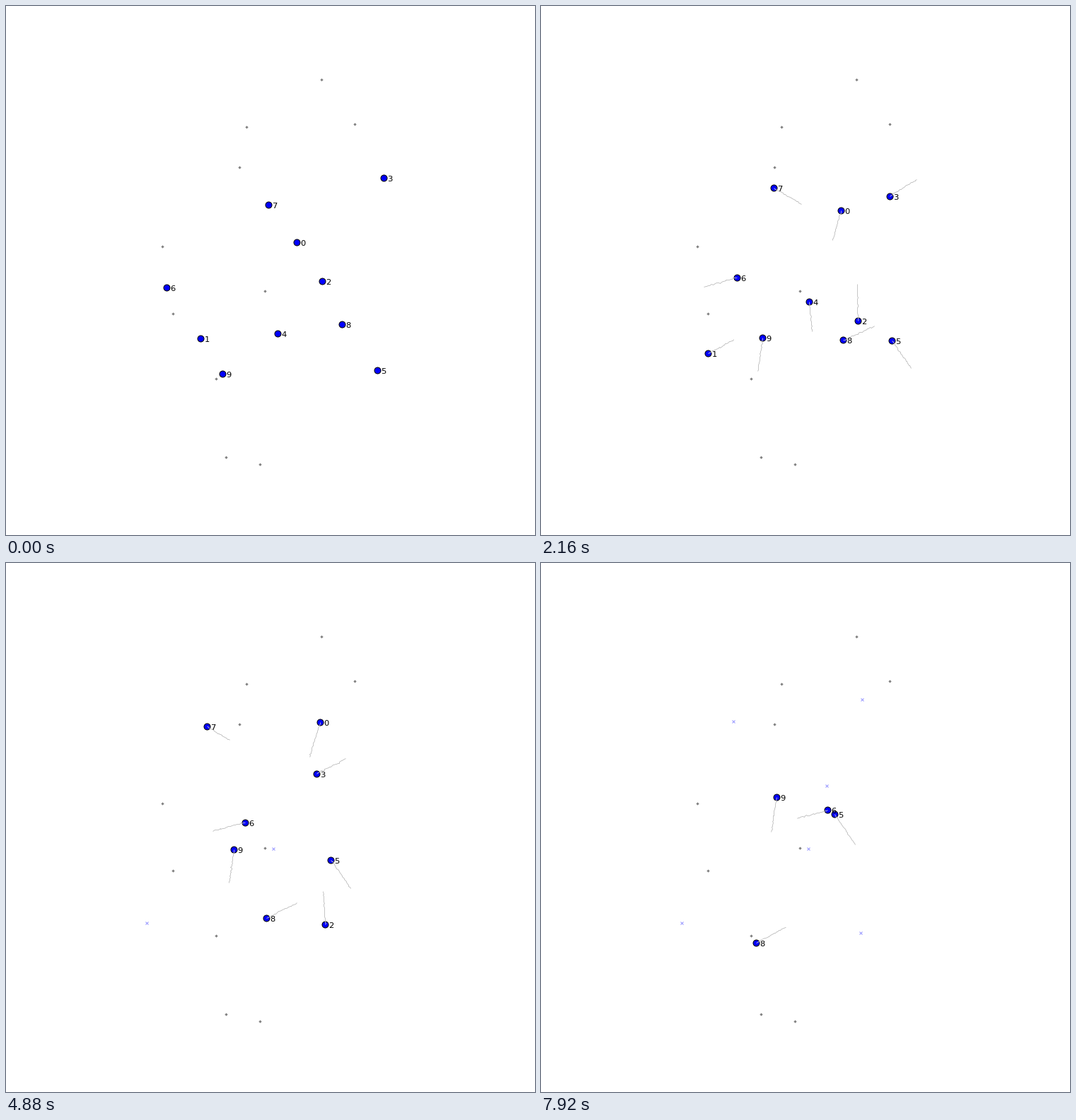
Recreate the animation shown at these times as a matplotlib script. Size 748x748 px, loop 8000 ms.

```python
import numpy as np
import matplotlib.pyplot as plt
from matplotlib.animation import FuncAnimation
from matplotlib.collections import LineCollection

SIZE, FRAMES, INTERVAL = 748, 100, 80
PX = 0.72          # one pixel in points at 100 dpi
TRAIL = 25         # remembered steps

# Start, halfway point, end, and number of steps in the walk
WALKERS = [
    ((411, 334), (430, 270), (454, 193), 77),
    ((275, 470), (232, 493), (199, 509), 60),
    ((447, 389), (448, 459), (452, 523), 67),
    ((534, 243), (472, 281), (404, 315), 82),
    ((384, 463), (380, 433), (378, 404), 35),
    ((525, 515), (472, 438), (414, 354), FRAMES),
    ((227, 398), (319, 371), (407, 349), FRAMES),
    ((371, 281), (316, 250), (272, 224), 71),
    ((475, 450), (387, 492), (302, 538), FRAMES),
    ((306, 520), (319, 426), (333, 329), FRAMES),
]

STONES = [(446, 104), (493, 167), (340, 171), (330, 228), (221, 340),
          (366, 403), (236, 435), (297, 527), (311, 638), (359, 648)]


def walk(start, halfway, end, life, rng):
    """Pixel positions along two even legs, with a slight stagger."""
    steps = np.arange(life)
    legs = [np.interp(steps, [0, life / 2, life], axis)
            for axis in zip(start, halfway, end)]
    stagger = rng.normal(0, 0.4, (life, 2))
    stagger[0] = 0
    return np.rint(np.column_stack(legs) + stagger)


rng = np.random.default_rng(5)
paths = [walk(*walker, rng) for walker in WALKERS]

fig = plt.figure(figsize=(SIZE / 100, SIZE / 100), dpi=100, facecolor="white")
ax = fig.add_axes([0, 0, 1, 1])
ax.set_xlim(-0.5, SIZE - 0.5)
ax.set_ylim(SIZE - 0.5, -0.5)
ax.axis("off")


def markers(shape, size, face, edge, z):
    return ax.plot([], [], ls="", marker=shape, ms=size * PX, mfc=face,
                   mec=edge, mew=PX, zorder=z)[0]


def place(artist, points):
    artist.set_data(*np.reshape(points, (-1, 2)).T)


stones = markers("D", 3, "#808080", "none", 1)
crosses = markers("x", 4, "none", "#9696ff", 2)
dots = markers("o", 9, "#0000ff", "black", 3)
trails = ax.add_collection(
    LineCollection([], colors="#c0c0c0", linewidths=0.9 * PX, zorder=4), autolim=False)
labels = [ax.text(0, 0, str(i), family="DejaVu Sans", size=11.5 * PX,
                  ha="left", va="baseline", zorder=5) for i in range(len(WALKERS))]
place(stones, STONES)


def update(frame):
    walking = [path for path in paths if frame < len(path)]
    place(dots, [path[frame] for path in walking])
    place(crosses, [end for *_, end, life in WALKERS if frame >= life])
    trails.set_segments([path[max(0, frame - TRAIL):frame + 1] for path in walking])
    for label, path in zip(labels, paths):
        label.set_visible(frame < len(path))
        if frame < len(path):
            label.set_position(path[frame] + 5)
    return stones, crosses, dots, trails, *labels


anim = FuncAnimation(fig, update, frames=FRAMES, interval=INTERVAL,
                     repeat=True, repeat_delay=0, blit=False)
plt.show()
```
